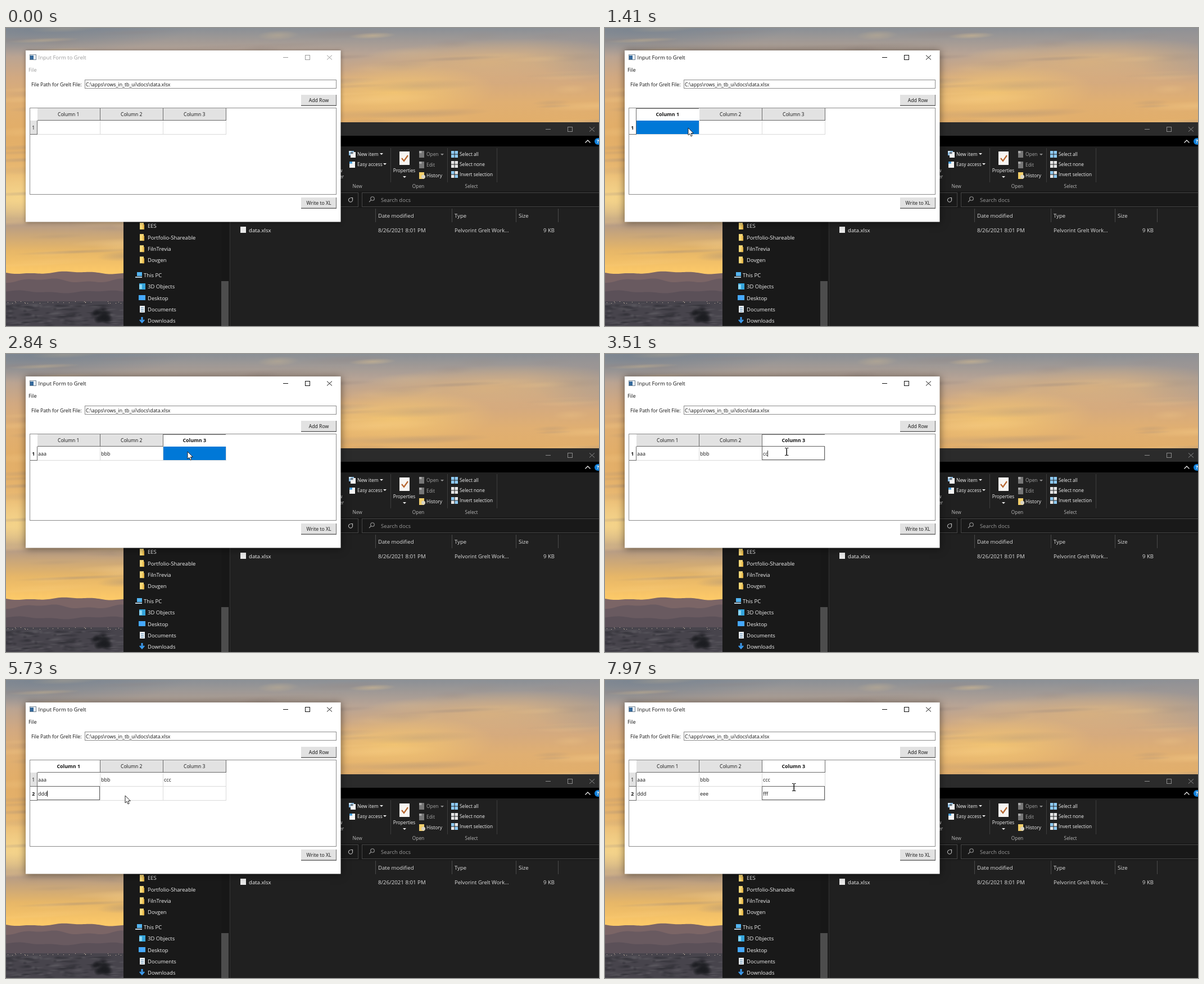
An HTML page with a canvas for the animation above (8000 ms loop, 1055 by 531 pixels).

```html
<!DOCTYPE html>
<html lang="en">
<head>
<meta charset="utf-8">
<title>Form entry</title>
<style>
html, body { margin: 0; width: 100%; height: 100%; overflow: hidden; background: #202020; }
canvas { display: block; }
</style>
</head>
<body>
<canvas id="stage" width="1055" height="531"></canvas>
<script>
const W = 1055, H = 531, LOOP = 8000;
const ctx = document.getElementById('stage').getContext('2d');
const back = document.createElement('canvas');
back.width = W; back.height = H;
let g = back.getContext('2d');

// ---------- helpers ----------
function box(x, y, w, h, fill) { g.fillStyle = fill; g.fillRect(x, y, w, h); }

function frame(x, y, w, h, color) {
  g.strokeStyle = color; g.lineWidth = 1;
  g.strokeRect(x + .5, y + .5, w - 1, h - 1);
}

function line(color, width, ...points) {
  g.beginPath();
  points.forEach(p => g.lineTo(...p));
  g.strokeStyle = color; g.lineWidth = width; g.stroke();
}

function disc(x, y, r, fill) {
  g.beginPath(); g.arc(x, y, r, 0, 7); g.fillStyle = fill; g.fill();
}

function arc(x, y, r, color, from = 0, to = 7) {
  g.beginPath(); g.arc(x, y, r, from, to);
  g.strokeStyle = color; g.lineWidth = 1.1; g.stroke();
}

// y is the middle of the capitals
function label(s, x, y, size, color, align = 'left', weight = 400) {
  g.font = `${weight} ${size}px "Open Sans", "Noto Sans", sans-serif`;
  g.textAlign = align; g.fillStyle = color;
  g.fillText(s, x, y + size * .36);
}

function glow(x, y, rx, ry, rgb, alpha) {
  g.save();
  g.translate(x, y); g.rotate(-.04); g.scale(rx, ry);
  const r = g.createRadialGradient(0, 0, 0, 0, 0, 1);
  r.addColorStop(0, `rgba(${rgb},${alpha})`);
  r.addColorStop(.5, `rgba(${rgb},${alpha * .55})`);
  r.addColorStop(1, `rgba(${rgb},0)`);
  g.fillStyle = r; g.fillRect(-1, -1, 2, 2);
  g.restore();
}

function random(seed) {
  return () => (seed = seed * 16807 % 2147483647) / 2147483647;
}

function winButtons(x, step, y, color) {
  box(x - 4, y, 9, 1, color);
  frame(x + step - 4, y - 4, 9, 9, color);
  const c = x + 2 * step;
  for (const s of [-1, 1]) line(color, 1, [c - 4, y - 4 * s + .5], [c + 5, y + 4 * s + .5]);
}

// ---------- desktop ----------
function sky() {
  const fade = g.createLinearGradient(0, 0, 0, 440);
  const hues = ['#8b9096', '#b6a395', '#d2a981', '#e0af72', '#e2ae69', '#e4b069',
    '#eabc76', '#eac888', '#b89d84', '#e6b668', '#ffcb68'];
  hues.forEach((c, i) => fade.addColorStop(i / (hues.length - 1), c));
  box(0, 0, W, H, fade);
  glow(60, 0, 280, 50, '116,128,142', .7);
  glow(1055, 30, 130, 70, '150,146,148', .6);
  glow(860, 60, 260, 40, '228,182,120', .6);
  glow(690, 115, 180, 50, '250,204,112', .7);
  glow(20, 300, 80, 50, '252,220,140', .6);
  const rnd = random(29);
  for (let i = 0; i < 170; i++) {
    const x = rnd() * W, y = rnd() * 425, warm = rnd() > .45;
    glow(x, y, 30 + rnd() * 90, 3 + rnd() * 8, warm ? '252,212,142' : '146,130,124', .1 + rnd() * .25);
  }
}

function desert() {
  ['#7b6566', '#695a60', '#5b5058', '#47444c'].forEach((color, i) => {
    const top = [436, 450, 470, 487][i], swell = [3, 5, 3, 0][i];
    g.beginPath(); g.moveTo(0, H);
    for (let x = 0; x <= 210; x += 3)
      g.lineTo(x, top + swell * (Math.sin(x / 25 + i * 2) * .6 + Math.sin(x / 9 + i) * .3));
    g.lineTo(210, H);
    g.fillStyle = color; g.fill();
  });
  const rnd = random(83);
  for (let i = 0; i < 130; i++)
    glow(rnd() * 210, 491 + rnd() * 40, 4 + rnd() * 14, 1 + rnd() * 3, rnd() > .5 ? '100,98,104' : '40,40,46', .45);
  for (let i = 0; i < 26; i++) box(rnd() * 205 | 0, 487 + rnd() * 4 | 0, 1, 1, '#c9b9a6');
  for (let i = 0; i < 16; i++) glow(155 + rnd() * 28, 501 + rnd() * 20, 9, 7, '26,27,31', .7);
}

// ---------- file browser ----------
const INK = '#f2f2f2', DIM = '#929292', GREY = '#b8b8b8';

function page(x, y, w, h, fill, tab) {
  box(x, y, w, h, fill);
  box(x, y, w / 2, h / 3, tab);
}

function arrowDown(x, y, color) {
  for (let i = 0; i < 3; i++) box(x - 2.5 + i, y - 1 + i, 5 - 2 * i, 1, color);
}

function ribbon() {
  box(209, 211, W, 80, '#202020');
  [684, 785, 873].forEach(x => box(x, 214, 1, 61, '#3d3d3d'));
  label('w', 592, 254, 8.3, INK);
  label('er', 593, 265, 8.3, INK);

  page(610, 219, 9, 8, '#8fbfe4', '#d8ecfa');
  page(613, 221, 9, 10, '#f4f4f4', '#687784');
  page(611, 238, 10, 11, '#f4f4f4', '#4aa3e0');
  label('New item', 625, 225, 8.5, INK); arrowDown(668, 224, INK);
  label('Easy access', 625, 243, 8.3, INK); arrowDown(674, 242, INK);

  box(700, 220, 18, 24, '#f7f5f2');
  line('#b6652e', 2.2, [704, 232], [708, 237], [715, 227]);
  label('Properties', 708.5, 254, 8.2, INK, 'center'); arrowDown(709, 265, INK);

  ['Open', 'Edit', 'History'].forEach((s, i) => {
    const y = 225 + i * 19;
    page(735, y - 6, 9, 12, i < 2 ? '#777' : '#f3cf6b', i < 2 ? '#a8a8a8' : '#f3cf6b');
    label(s, 748, y, 8.4, i < 2 ? '#a5a5a5' : INK);
  });
  arrowDown(776, 225, DIM);
  disc(742.5, 265, 3.5, '#d9d4c4');

  ['Select all', 'Select none', 'Invert selection'].forEach((s, i) => {
    const y = 225 + i * 18;
    for (let k = 0; k < 4; k++) {
      const lit = i === 0 || (i === 2 && k % 3 === 0);
      box(792 + k % 2 * 6.5, y - 6 + (k >> 1) * 6.5, 5.5, 5.5, lit ? '#8ecbf5' : '#e6e6e6');
    }
    label(s, 807, y, 8.3, INK);
  });
  [['New', 625], ['Open', 733.5], ['Select', 828]].forEach(([s, x]) => label(s, x, 282, 8.3, GREY, 'center'));
}

function sidebar() {
  box(209, 321, 189, 210, '#191919');
  box(398, 321, 1, 210, '#333');
  box(383, 345, 13, 186, '#171717');
  box(383, 451, 13, 80, '#4d4d4d');
  ['EES', 'Portfolio-Shareable', 'FilnTrevia', 'Dovgen'].forEach((s, i) => {
    const y = 353 + i * 20.1;
    box(238, y - 6, 7, 12, '#f9d978'); box(243, y - 3, 3, 9, '#e6b84c');
    label(s, 252, y, 9.5, INK);
  });
  box(233, 435, 9, 7, '#53b4f0'); box(230, 443, 12, 2, '#b9cfdd');
  label('This PC', 245, 440.5, 9.5, INK);
  ['3D Objects', 'Desktop', 'Documents', 'Downloads'].forEach((s, i) => label(s, 252, 461 + i * 20.1, 9.5, INK));
  box(237, 455, 11, 11, '#35a5dc'); box(237, 457, 5, 8, '#8bd6f2');
  box(236, 476, 12, 9, '#45a8ff');
  box(238, 495, 9, 12, '#e9eef2');
  for (let y = 498; y < 506; y += 3) box(240, y, 5, 1, '#5d8fb8');
  line('#3c9cf0', 3, [242, 515], [242, 523]);
  line('#3c9cf0', 2.4, [238, 520], [242, 524.5], [246, 520]);
}

function browser() {
  box(209, 168, W, 363, '#202020');
  box(209, 168, W, 24, '#2b2b2b');
  winButtons(964, 39, 180, '#8c8c8c');
  box(209, 192, W, 19, '#000');
  line('#e8e8e8', 1.3, [1030.5, 204.5], [1035, 200], [1039.5, 204.5]);
  disc(1053, 202, 6, '#1081dc');
  label('?', 1053, 202, 9, '#fff', 'center', 700);
  ribbon();

  box(209, 291, W, 30, '#191919');
  frame(400, 293, 227, 26, '#454545');
  frame(633, 293, 440, 26, '#454545');
  arc(613, 306.5, 3.6, '#bdbdbd', -.4, 4.6);
  line('#bdbdbd', 1.2, [613, 302.5], [616.5, 302.5], [616.5, 306]);
  arc(652, 304, 3.3, '#9a9a9a');
  line('#9a9a9a', 1.1, [649.6, 306.4], [646, 310]);
  label('Search docs', 667, 306.5, 9.5, '#9a9a9a');

  sidebar();
  [657, 793, 907, 982].forEach(x => box(x, 322, 1, 24, '#4a4a4a'));
  [['Date modified', 662], ['Type', 798], ['Size', 912]].forEach(([s, x]) => label(s, x, 335, 9.6, '#dedede'));
  box(417, 354, 10, 11, '#e9e9e9');
  label('data.xlsx', 432, 360.5, 9.6, INK);
  label('8/26/2021 8:01 PM', 662, 360.5, 9.7, '#dedede');
  label('Pelvorint Grelt Work...', 798, 360.5, 9.5, '#dedede');
  label('9 KB', 976, 360.5, 9.5, '#dedede', 'right');
}

// ---------- timeline ----------
const ACTIVATE = 940, ADD_ROW = 4380;

// a cell is picked, opened soon after, and gets three letters at an even pace
const ENTRIES = [[1300, 1690], [2160, 2440], [2840, 3580], [5190, 5530], [5800, 6140], [6530, 7070]]
  .map(([pick, last], i) => ({
    row: i / 3 | 0, col: i % 3, char: 'abcdef'[i],
    pick, edit: pick + 130, keys: [last - 140, last - 70, last]
  }));

// where the pointer arrives, and when
const STOPS = [
  [120, 1000, 545], [870, 116, 188], [1270, 148, 178], [1960, 217, 177], [2300, 243, 172],
  [2800, 323, 174], [4180, 554, 124], [4640, 395, 174], [5060, 112, 206], [5700, 212, 206],
  [6460, 322, 203], [7400, 431, 223], [7900, 336, 191]
];

function pointer(t) {
  let [, x, y] = STOPS[0];
  for (const [end, x1, y1] of STOPS.slice(1)) {
    const span = 200 + .58 * Math.hypot(x1 - x, y1 - y);
    const u = Math.min(1, 1 - (end - t) / span);
    if (u <= 0) break;
    const k = u * (.5 + u * (1.5 - u));
    x += (x1 - x) * k; y += (y1 - y) * k;
  }
  return [x, y];
}

// ---------- form window ----------
const LINE = '#696969', GRID = '#dadada';
const colX = c => 56 + c * 112, rowY = r => 165 + r * 25;

function header(x, y, w, h, text, current, sunken) {
  box(x, y, w, h, current ? '#fff' : '#e2e2e2');
  if (sunken) {
    box(x - 1, y, w, 1, LINE); box(x - 1, y, 1, h, LINE);
  } else {
    box(x, y + h - 1, w, 1, LINE); box(x + w - 1, y, 1, h, LINE);
  }
  label(text, x + w / 2 - .8, y + h / 2, current ? 8.9 : 8.6, '#111', 'center', current ? 700 : 400);
}

function button(text, y, pressed) {
  box(525, y, 63, 20, '#e2e2e2');
  if (pressed) frame(525, y, 63, 20, LINE);
  else {
    box(525, y + 18, 63, 1, '#a5a5a5'); box(525, y + 19, 63, 1, LINE); box(587, y, 1, 20, LINE);
  }
  label(text, 556.5 + pressed, y + 10 + pressed, 8.7, '#111', 'center');
}

function cell(e, t, live, editing, idle) {
  const x = colX(e.col), y = rowY(e.row);
  const n = e.keys.filter(k => k <= t).length, text = e.char.repeat(n);
  let ink = '#111';
  if (live && idle) { box(x, y, 111, 24, '#f0f0f0'); ink = '#5a5a3c'; }
  else if (live && editing) { box(x - 1, y - 1, 112, 25, '#fff'); frame(x - 1, y - 1, 112, 25, '#606060'); }
  else if (live) { box(x, y, 111, 24, '#0078d7'); ink = '#fff'; }
  label(text, x + 1, y + 12.5, 9, ink);
  if (!live || !editing) return;
  const since = t - (n ? e.keys[n - 1] : e.edit);
  if (since % 1060 < 530) box(Math.floor(x + 1 + g.measureText(text).width), y + 7, 1, 11, '#333');
}

function table(t, entry, editing, idle) {
  const rows = t < ADD_ROW ? 1 : 2;
  frame(42, 142, 546, 155, '#8a8a8a');
  for (let r = 0; r < rows; r++) {
    header(43, rowY(r), 13, 25, String(r + 1), entry && entry.row === r, false);
    box(56, rowY(r) + 24, 336, 1, GRID);
    for (let c = 0; c < 3; c++) box(colX(c) + 111, rowY(r), 1, 25, GRID);
  }
  for (let c = 0; c < 3; c++) {
    const current = entry && entry.col === c;
    header(colX(c), 143, 112, 22, `Column ${c + 1}`, current, current && rows === 1);
  }
  ENTRIES.filter(e => e.pick <= t).forEach(e => cell(e, t, e === entry, editing, idle));
}

function formWindow(t, entry, editing, idle) {
  const active = t >= ACTIVATE, ink = active ? '#111' : '#9a9a9a';
  g.save();
  g.shadowColor = `rgba(0,0,0,${active ? .5 : .35})`;
  g.shadowBlur = active ? 13 : 7; g.shadowOffsetY = 1;
  box(35, 40, 560.5, 305.5, '#fff');
  g.restore();

  box(42, 47, 12, 10, '#f2f5f8'); box(43, 49, 6, 7, '#35699c'); frame(42, 47, 12, 10, '#738391');
  label('Input Form to Grelt', 57.5, 53, 9.5, ink);
  winButtons(497, 39, 52, ink);
  label('File', 40, 74.5, 9.2, ink);

  label('File Path for Grelt File:', 45, 101, 8.75, '#111');
  frame(140, 92, 448, 16, '#8a8a8a');
  label('C:\\apps\\rows_in_tb_ui\\docs\\data.xlsx', 142, 101, 8.75, '#111');
  button('Add Row', 119, t >= ADD_ROW && t < ADD_ROW + 70);
  table(t, entry, editing, idle);
  button('Write to XL', 302, false);
}

function drawPointer(x, y, beam) {
  if (beam) {
    box(x - .5, y - 6, 1.4, 13, '#000');
    for (const d of [-7, 6]) { box(x - 3, y + d, 2.6, 1, '#000'); box(x + .8, y + d, 2.6, 1, '#000'); }
    return;
  }
  g.save();
  g.translate(x, y);
  const shape = new Path2D('M0 0V13L3 10.4L5 15L7.2 14L5.2 9.6L9.3 9.4Z');
  g.fillStyle = '#fff'; g.fill(shape);
  g.strokeStyle = '#111'; g.lineWidth = .9; g.stroke(shape);
  g.restore();
}

function draw(t) {
  const entry = ENTRIES.filter(e => e.pick <= t).pop();
  const idle = t >= ADD_ROW && t < ENTRIES[3].pick;
  const editing = !!entry && t >= entry.edit && !idle;
  const [x, y] = pointer(t);
  g.drawImage(back, 0, 0);
  formWindow(t, entry, editing, idle);
  const dx = editing ? x - colX(entry.col) : -1, dy = editing ? y - rowY(entry.row) : -1;
  drawPointer(x, y, dx >= 0 && dx < 112 && dy >= 0 && dy < 25);
}

sky();
desert();
browser();
g = ctx;
const start = performance.now();
function tick() {
  draw((performance.now() - start) % LOOP);
  requestAnimationFrame(tick);
}
tick();
</script>
</body>
</html>
```
